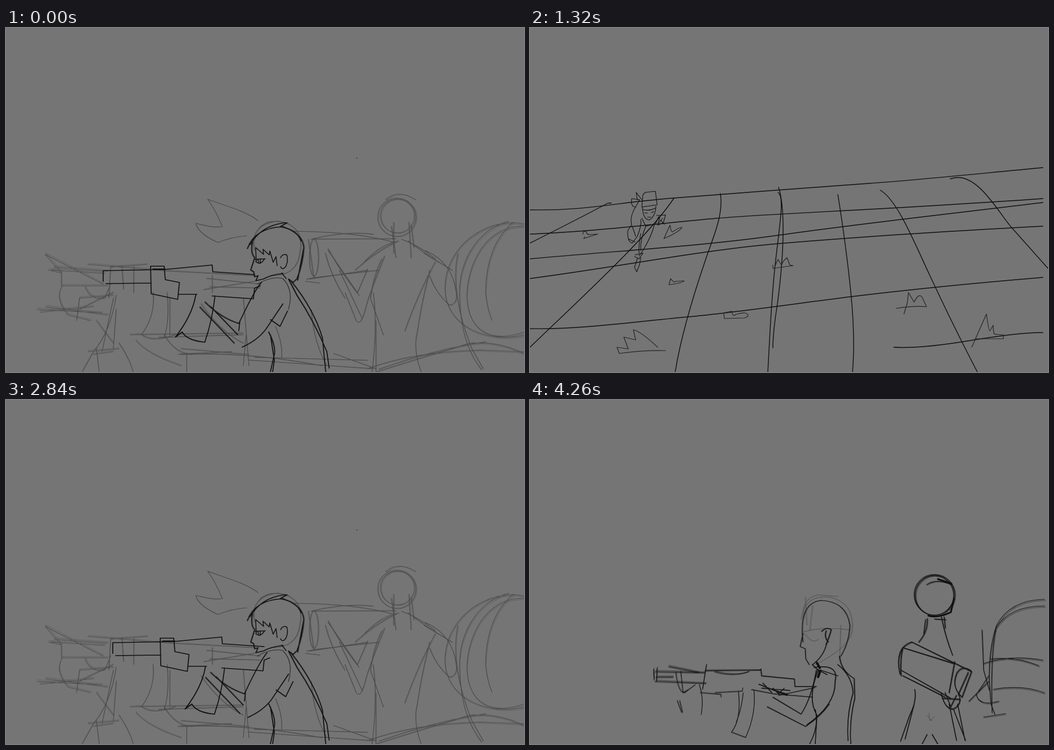
Recreate the animation shown at these times as an HTML page with a canvas. Size 917 px wide and 611 px high, loop 4660 ms.

```html
<!DOCTYPE html>
<html lang="en">
<head>
<meta charset="utf-8">
<title>Storyboard sketch</title>
<style>
html, body { margin: 0; width: 100%; height: 100%; overflow: hidden; background: #757575; }
canvas { display: block; width: 100vw; height: 100vh; }
</style>
</head>
<body>
<canvas id="stage" width="917" height="611"></canvas>
<script>
const ctx = document.getElementById('stage').getContext('2d');
const LOOP = 4660;
const INK = '#101010', FAINT = '#4a4a4a';
const path = d => new Path2D(d);

// Trenches: pale underdrawing
const under = {
  flash: path('M446 342C425 325 385 315 357 304Q372 325 383 353C365 355 350 350 336 347Q340 365 375 381Q400 371 426 369'),
  head: path('M658 336a34 34 0 1 0 68 0a34 34 0 1 0 -68 0M663 334a30 30 0 1 0 60 0a30 30 0 1 0 -60 0M672 305Q695 285 725 305M682 352L690 408M686 345L686 400M713 345L717 408M717 350L722 390'),
  tube: path('M540 375L690 374M510 361L550 362Q630 365 685 380M547 443L660 430M537 446Q590 438 640 430M537 408a8 33 0 1 0 16 0a8 33 0 1 0 -16 0M540 375Q600 360 650 366M535 375L545 445M532 446L548 443'),
  torso: path('M690 380Q650 400 618 430M695 378Q660 385 630 420M712 378Q740 400 765 415M700 375Q730 385 760 410M570 392Q590 430 625 475M565 400Q575 440 600 480M600 470L620 520Q628 530 636 500Q640 480 670 405M570 395L622 470L640 428M590 430L630 515M650 470Q658 530 648 611M645 480L668 545M655 520L655 611M665 410Q650 440 645 480M760 415Q730 470 706 538M750 430Q735 490 728 540Q720 570 735 611M742 395Q790 415 797 470Q800 490 785 492Q760 470 750 440M740 400L790 430'),
  wheel: path('M917 348C860 335 777 380 777 465C780 530 850 560 917 546M890 343C830 360 800 420 803 480C806 560 830 590 842 607M917 352C850 350 815 420 816 480C820 540 860 560 917 540M898 345Q850 385 849 470Q852 500 860 518M800 400Q785 470 825 570L845 605'),
  ground: path('M655 611Q720 590 820 560Q870 555 917 578M640 605Q720 575 840 572L917 575M660 606Q760 570 850 557M440 585L640 590M430 590L650 605M580 578L655 605M310 580Q430 575 560 600'),
  muzzle: path('M69 402L172 455M69 402L98 435L75 430M85 425L180 432M98 435L98 458L180 458M80 430L175 436M145 420L290 432M185 425L250 420M100 458Q85 480 110 510L150 520M55 500L170 506M60 505L155 495M70 495L180 510M130 500L190 470M125 520L130 480L190 475M140 460Q150 485 175 480L185 455M205 424L208 465M226 424L226 470M185 424L182 480'),
  leftLegs: path('M195 475Q185 540 155 575L135 611M160 570L165 611M190 480L170 575M195 500L190 570M145 575L200 570M155 580L190 575M200 560Q220 590 225 611M160 520L190 560M260 470Q265 510 240 545L220 545M285 470Q290 520 280 550M290 480L290 545M230 545L420 542M270 550L420 545M240 545Q260 560 300 545'),
  middle: path('M310 570L430 580M305 580L400 575M320 578L320 611M280 545Q300 580 330 580M345 490Q380 540 420 560M420 480L430 600M425 545L420 600M230 555Q250 580 310 600M290 432L440 440M355 445L450 455M360 460L450 462M350 465L440 450M365 440L365 470M530 450L555 453M440 395Q430 350 480 343Q530 350 520 400Q515 440 470 440M445 360Q460 335 500 348M540 500Q545 560 568 600M477 530Q490 560 488 585')
};

// Trenches: inked shooter
const shooter = {
  head: path('M427 392Q440 355 490 353Q525 365 527 390Q525 420 515 445M432 385Q450 352 492 346L497 346L485 353Q515 358 522 378M436 380Q432 400 440 408L433 430L438 433L440 442L446 440L442 449L455 446Q470 438 490 436M527 390L516 448'),
  face: path('M443 415L442 390L456 402L455 393L466 403L467 396L473 416L478 406L480 422M486 408Q490 400 497 403Q500 412 496 422Q490 432 486 424M488 435L496 445M441 411L459 410M442 415Q450 422 457 411M446 410L447 417M450 410L450 418'),
  back: path('M500 446L515 475Q545 520 568 575L572 604M505 450Q545 500 560 550L566 611M500 446L508 452L514 446M465 540Q478 565 475 580L468 611M468 545L475 590L472 611'),
  shoulder: path('M445 455Q470 440 490 445Q510 465 500 500'),
  gun: path('M172 431L172 450M177 454L257 453M172 431L280 429M256 423L280 423L282 447L307 452L304 482L257 472L256 423M260 428L282 428M280 429L365 421L366 433L440 438M306 473L338 473M365 476L438 481L440 462L450 458M336 474Q330 510 300 549L312 540Q320 555 352 558Q365 520 370 476'),
  arms: path('M352 487Q380 515 412 525Q440 465 452 452M343 496L404 560M362 495L410 545M418 567Q445 555 460 535L490 490M468 518L485 530L498 503M412 538L414 520')
};

// Field
const grid = path('M0 323C100 325 150 310 255 302S500 283 600 276S800 258 908 248M0 366C110 362 240 346 330 338S640 322 908 303M0 410C150 396 300 388 440 368S760 328 908 310M0 445C160 424 300 395 440 383S700 363 908 352M0 534C90 536 200 520 280 513S480 488 570 477S800 452 908 443M644 567Q690 570 780 555T908 541');
const rays = path('M0 382Q80 342 138 311L144 311M0 567C90 480 210 370 255 302M337 294C343 330 325 370 313 405S270 530 257 611M440 283C452 320 450 400 438 490Q430 540 430 568M439 292C452 300 440 360 433 430S424 560 421 611M545 296Q560 390 568 470T571 611M620 288C650 305 680 380 708 440S760 550 792 611M744 268C790 250 830 330 854 356L917 427');
const tufts = [
  [374, 'M95 374L97 371M94 366L94 362L99 361Q101 368 106 367L120 366L95 374'],
  [374, 'M237 374L248 350Q250 366 254 361Q264 354 269 354Q265 362 237 374'],
  [456, 'M246 456L249 445Q254 453 258 450L273 449Q270 453 246 456'],
  [427, 'M430 421L430 427L466 422L460 421L455 408Q448 413 445 421L439 411L434 422'],
  [516, 'M344 516L343 506L357 503Q359 514 364 509Q386 502 386 512L380 515L344 516'],
  [578, 'M226 567Q195 538 183 536L187 554L166 549L174 570L154 567L158 578Q200 572 240 573'],
  [508, 'M648 498Q680 493 702 495L694 478Q688 470 680 487L670 470L668 488L662 508'],
  [567, 'M782 567L808 508Q812 538 814 538L820 528Q820 545 824 544L838 545V552H788']
].map(([base, d]) => [base, path(d)]);
const runner = {
  head: path('M204 292L222 290L225 314L198 318L200 296ZM199 318Q200 340 211 341Q222 335 223 316M199 322Q210 326 222 320M203 328L208 329M215 328L219 326M208 336L214 336M190 305L188 292L198 305M180 303Q178 318 187 318L194 305L180 303'),
  body: path('M187 318Q176 335 180 350L173 360Q172 380 181 382L190 370Q198 350 196 340M181 352L187 370M175 375L186 380M198 338L205 352L222 348L228 335M224 333L240 332L236 346L226 350L230 335M231 341L238 349M235 338L228 346'),
  legs: path('M196 365Q192 390 193 400M220 350Q215 370 200 395L193 405M205 352Q195 375 196 395M186 403L200 400L193 410L185 406M190 410L185 425L189 433L194 420L196 408')
};
const ghost = [
  [513, 320, 503, 350, 500, 400, 515, 440, 543, 458], [515, 328, 555, 345],
  [555, 350, 585, 305, 607, 283],
  [625, 293, 655, 325, 660, 370, 625, 415, 600, 440, 570, 425, 556, 350],
  [660, 390, 700, 400, 722, 470, 728, 500],
  [545, 475, 560, 430, 600, 455, 660, 470, 720, 480],
  [560, 485, 600, 490, 650, 515, 715, 520],
  [528, 515, 518, 580], [592, 550, 582, 580], [690, 520, 683, 580]
];

// Rough pass
const car = path('M911 354Q850 355 826 400Q812 440 813 500L816 540L823 558M911 366Q850 365 825 405Q815 450 818 555M800 408L803 480L813 515M803 468Q850 452 908 462M815 460Q860 455 901 472M820 514Q870 505 911 520M803 563L842 557M812 490L790 523Q795 545 830 535M777 535L812 500');
const aimer = {
  head: path('M480 393a40 41 0 1 0 80 0a40 41 0 1 0 -80 0M470 385Q475 345 515 338M468 380Q466 420 500 436M486 350Q550 330 565 380Q565 430 530 450M480 430Q510 445 560 440M483 445Q520 430 572 442'),
  face: path('M500 337Q478 375 478 425L485 460M481 385L473 420L476 432L480 430L478 440L487 460M470 418L482 428M472 436L490 446M457 361L470 358M575 382L577 412L572 395M575 369L582 370M444 430L460 448M450 457L470 468M443 420L452 424'),
  body: path('M490 468Q530 455 550 460Q590 490 589 530L582 585M545 460Q575 490 575 530L574 608M565 480Q578 520 572 570M570 490L585 560M495 465Q530 466 552 458M470 500Q490 470 500 465M500 530Q515 560 505 611M495 535Q506 570 496 611M507 540L510 600M517 512L500 545M470 510L492 530'),
  arm: path('M385 500L437 578M372 488L420 545M440 580Q480 560 500 535M442 543L490 480M412 495L455 545M440 548L490 530M366 503L470 508M376 509L450 503M400 500L412 514M418 500L424 513M436 575Q470 560 495 530'),
  collar: path('M484 471L490 470L484 484M476 490L463 508')
};
const rifle = {
  barrel: path('M145 455L146 475M152 453L151 478M148 460L250 462M148 478L252 482M176 450L240 462M253 447L245 493M150 470L185 470M250 458L365 457M270 460Q310 470 340 460M364 455L366 468L433 474L434 488L478 488'),
  grip: path('M240 500L282 503L283 508M270 500L326 497L327 491M318 497Q325 550 304 574L333 584Q355 540 350 495M328 500Q325 530 314 555M345 494L390 502L470 508M400 505L450 495L475 490M190 462Q195 500 208 500L230 485M200 460L205 500L215 495M238 485Q248 510 242 541M193 515L202 537M198 515L204 537')
};
const settled = {
  head: path('M487 350L490 400M480 390Q485 345 530 350Q575 360 570 410Q565 440 505 470M486 415Q500 435 510 425M500 365L495 410M483 412Q515 402 565 408M550 400L548 460M484 385Q480 352 510 346L545 349'),
  face: path('M483 430Q475 360 515 356Q560 358 566 400Q565 430 550 455M483 415L478 438L487 442L488 460L494 470M525 432Q520 455 500 470'),
  ear: path('M516 411Q525 402 533 408Q530 420 524 434M524 410Q520 422 528 430'),
  body: path('M548 455Q550 480 574 495L575 530Q565 570 568 611M545 470Q570 490 572 520Q560 560 563 605M503 475Q548 468 540 500Q542 540 490 577M510 480Q490 530 508 560L505 611M507 480Q498 530 480 558L430 528M420 545L488 580Q515 562 530 540M505 550Q512 580 495 611M515 480L545 490M508 478L526 488M500 470L512 482L510 492'),
  hands: path('M405 505L455 525M410 512L460 516M430 512L440 522L450 512M412 503L428 520M434 516L456 523'),
  collar: path('M508 467L513 476M514 481L510 492')
};
const guardFront = {
  head: path('M693 360a33 34 0 1 0 66 0a33 34 0 1 0 -66 0M691 362a36 40 0 1 0 72 0a36 40 0 1 0 -72 0'),
  body: path('M740 395L742 425Q755 450 758 490M757 490Q750 540 765 602M752 500L757 570L768 602M700 530L697 570L681 607M702 535L695 590M722 575L716 611M720 573L730 600M722 580L725 611'),
  tube: path('M674 425L690 500L703 530M680 430Q690 420 700 425L740 485M715 440Q735 425 742 440L747 450L735 475M683 428Q676 460 692 515M693 435L705 505M699 515a23 27 28 1 0 46 -12a23 27 28 1 0 -46 12'),
  rim: path('M675 424Q676 470 697 527M698 421L742 486M699 502Q718 476 744 487')
};
const guardSide = {
  head: path('M682 347a34 35 0 1 0 68 0a34 35 0 1 0 -68 0M680 346a36 36 0 1 0 72 0a36 36 0 1 0 -72 0M702 328Q720 316 746 328'),
  body: path('M703 388Q705 410 688 430M700 390L697 415M728 385Q735 420 748 453M733 385L735 405M716 389L736 390M681 514Q685 535 672 560L656 606M680 540L664 602M742 540L755 604M750 550L771 604M757 540L770 604M703 594L694 611M712 594L722 611'),
  tube: path('M676 430L781 482M660 440L750 468M655 487Q645 440 676 430M657 480L745 530M660 490Q700 510 735 528M756 485Q745 510 765 528L782 482Q765 470 756 485M776 484L758 524M752 465L742 520M660 440Q655 460 657 490M728 522Q735 550 750 549Q765 540 760 525M735 520L745 545L755 525M730 530L762 532'),
  rim: path('M722 318L746 326M705 383Q722 388 745 377L751 352')
};
const scratch = path('M702 560L712 570M706 557L708 570L716 562');

function at(matrix, draw) {
  ctx.save();
  ctx.transform(...matrix);
  draw();
  ctx.restore();
}
const shifted = (x, y, draw) => at([1, 0, 0, 1, x, y], draw);

function line(shape, color = INK, width = 1.4, alpha = 1) {
  ctx.strokeStyle = color;
  ctx.lineWidth = width;
  ctx.globalAlpha = alpha;
  ctx.stroke(shape);
  ctx.globalAlpha = 1;
}

// Each stroke is retraced, slightly turned, like loose pencil work.
function sketch(shape, color = INK, width = 1.4, retraces = 1) {
  line(shape, color, width, .9);
  for (let i = 1; i <= retraces; i++) {
    const turn = i % 2 ? .006 : -.005;
    at([1, turn, -turn, 1, turn * 450 + turn * 170, turn * -520], () =>
      line(shape, color, width * .85, .5));
  }
}
const sketchAll = (parts, color, width) => Object.values(parts).forEach(p => sketch(p, color, width));

// Offsets of gun, arms and body through one recoil
const rest = [0, 0, 0], kick = [17, 10, 0], push = [22, 14, 5], peak = [27, 18, 10];
const recoil = [rest, kick, push, peak, push, kick, rest];

function trenches(t) {
  sketchAll({ ...under, flash: new Path2D() }, FAINT, 1.1);
  line(under.flash, FAINT, 1.2);
  ctx.fillStyle = FAINT;
  ctx.fillRect(620, 230, 2, 2);
  const [gun, arm, body] = recoil[Math.floor(t / 40) % 7];
  shifted(body, 0, () => {
    sketch(shooter.head, INK, 1.6);
    line(shooter.face, INK, 1.5);
    sketch(shooter.back, INK, 1.7);
    line(shooter.shoulder, '#2c2c2c', 1.2);
  });
  shifted(arm, -arm * .3, () => sketch(shooter.arms, INK, 1.6));
  shifted(gun, 0, () => line(shooter.gun, INK, 1.7));
}

function dashes(spread) {
  const marks = new Path2D();
  let n = 0;
  for (const points of ghost) {
    for (let i = 0; i + 3 < points.length; i += 2) {
      const [x0, y0, x1, y1] = points.slice(i, i + 4);
      const count = Math.ceil(Math.hypot(x1 - x0, y1 - y0) / 9);
      for (let j = 0; j < count; j++) {
        const px = x0 + (x1 - x0) * j / count, py = y0 + (y1 - y0) * j / count;
        const x = spread ? 627 + (px - 612) * 1.9 : px;
        const y = spread ? py - 34 : py;
        const half = 8 + 3 * Math.sin(++n * 2.4);
        const lean = x1 > x0 && y1 > y0 ? -2 : 2.5;
        marks.moveTo(x + lean, y - half);
        marks.lineTo(x - lean, y + half);
      }
    }
  }
  line(marks, '#303030', 2.6, .8);
}

function field(t) {
  line(grid);
  line(rays);
  const step = t < 1000 ? Math.floor(t / 100) : t < 1080 ? 10 : t < 1160 ? 11 : 12;
  const sway = [-.12, .12, 0][Math.min(step, 11) % 3];
  for (const [base, shape] of tufts) {
    at([1, 0, sway, 1, -sway * base, 0], () => line(shape, '#242424', 1.2));
  }
  if (step === 11) dashes(false);
  else if (t < 1240 && step === 12) dashes(true);
  else if (step < 11) {
    const k = (step - 2) / 8, s = 2.3 ** k, side = step % 2 ? -s : s;
    at([side, 0, 0, s, 205 + 407 * k - side * 205, 362 + 68 * k - s * 362], () =>
      Object.values(runner).forEach(p => line(p, INK, 1.1 / Math.sqrt(s))));
  }
}

function drawRifle() {
  sketch(rifle.barrel, INK, 1.3, 2);
  sketch(rifle.grip, INK, 1.2);
}

function drawGuard(guard) {
  sketch(guard.head, INK, 1.4);
  sketch(guard.body, INK, 1.5);
  sketch(guard.tube, INK, 1.4, 2);
  line(guard.rim, INK, 3);
}

function rough(t) {
  const step = Math.floor(t / 100);
  if (step < 4) {
    for (const part of ['head', 'tube', 'torso', 'wheel']) sketch(under[part], INK, 1.2);
  } else {
    sketch(car, INK, 1.2);
    drawGuard(step < 6 ? guardFront : guardSide);
    if (step >= 6) line(scratch, '#505050', 1);
  }
  if (t < 900) {
    shifted([-44, -44, -44, -30, -15][step] || 0, 0, () => {
      sketch(aimer.head, '#333', 1);
      sketch(aimer.face, INK, 1.3, 2);
      sketch(aimer.body, INK, 1.4, 2);
      sketch(aimer.arm, INK, 1.3, 2);
      line(aimer.collar, INK, 5);
      drawRifle();
    });
  } else {
    const reach = t < 1300 ? -50 : 0;
    sketch(settled.head, '#505050', .9);
    sketch(settled.face, INK, 1.2);
    sketch(settled.ear, INK, 1.6);
    sketch(settled.body, INK, 1.3, 2);
    line(settled.collar, INK, 4);
    shifted(reach, 0, () => {
      sketch(settled.hands, INK, 1.4);
      at([.865, 0, 0, .945, 93.6, 47.8], drawRifle);
    });
  }
}

function frame(now) {
  const t = now % LOOP;
  ctx.fillStyle = '#757575';
  ctx.fillRect(0, 0, 917, 611);
  ctx.lineCap = ctx.lineJoin = 'round';
  if (t < 1120) trenches(t);
  else if (t < 2640) field(t - 1120);
  else if (t < 2960) trenches(t - 2640);
  else rough(t - 2960);
}

let start;
function tick(now) {
  start ??= now;
  frame(now - start);
  requestAnimationFrame(tick);
}
frame(0);
requestAnimationFrame(tick);
</script>
</body>
</html>
```
